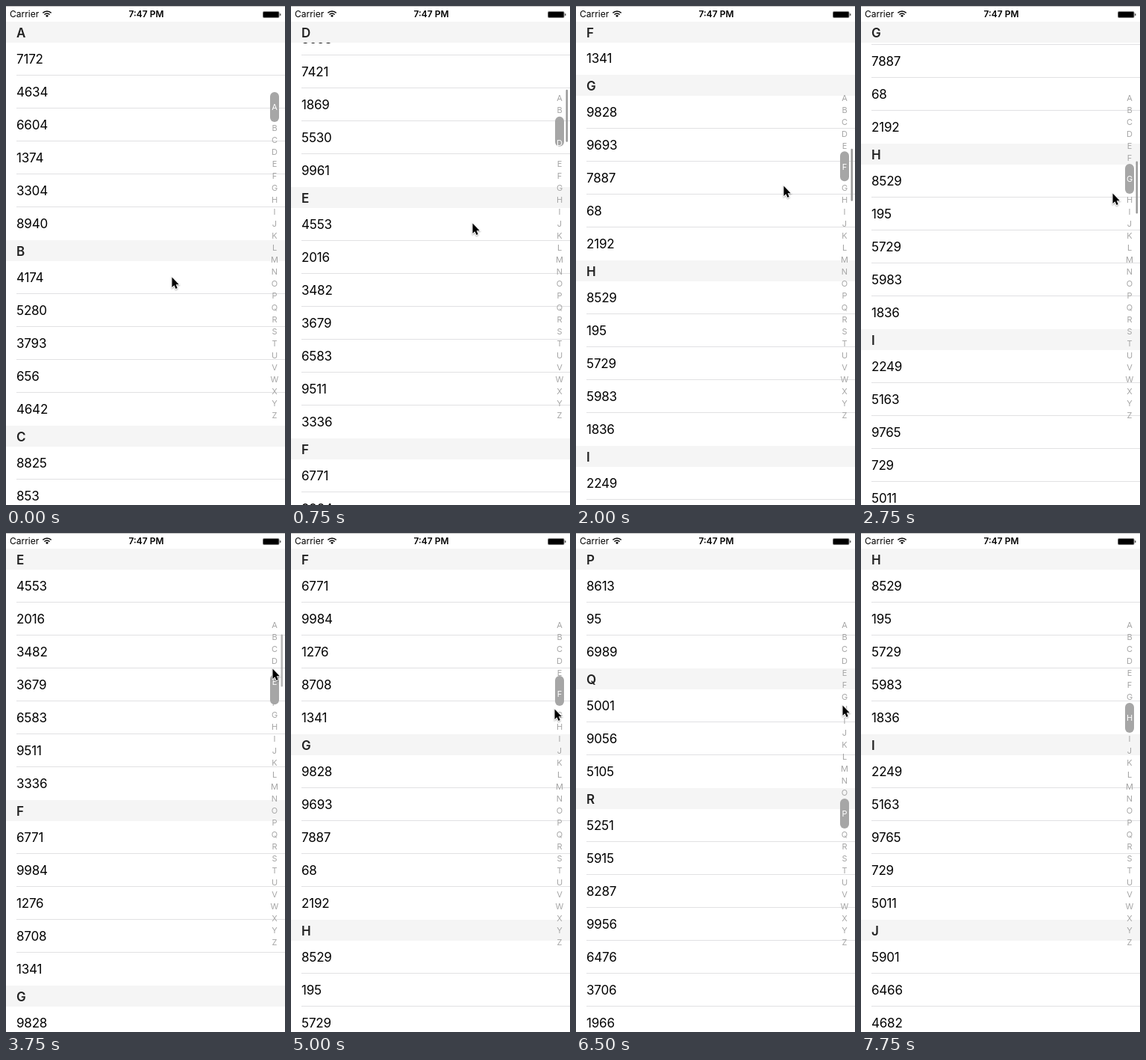
These frames come from a looping animation (374x667 px, 8 s). An HTML page with a canvas:

```html
<!DOCTYPE html>
<html lang="en">
<head>
<meta charset="utf-8">
<title>Indexed list</title>
<style>
html, body { margin: 0; width: 100%; height: 100%; overflow: hidden; background: #fff; }
canvas { display: block; }
</style>
</head>
<body>
<canvas id="stage" width="374" height="667"></canvas>
<script>
const ctx = document.getElementById('stage').getContext('2d');
const W = 374, H = 667, LOOP = 8000, STEP = 250;
const TOP = 21, HEAD = 28, ROW = 44;
const FONT = 'Inter, Roboto, "Liberation Sans", sans-serif';
const LETTERS = 'ABCDEFGHIJKLMNOPQRSTUVWXYZ';

// List content; sections without an entry get seeded random numbers.
const ROWS = {
  A: '7172 4634 6604 1374 3304 8940',
  B: '4174 5280 3793 656 4642',
  C: '8825 853 6127 2940 7316',
  D: '3058 7421 1869 5530 9961',
  E: '4553 2016 3482 3679 6583 9511 3336',
  F: '6771 9984 1276 8708 1341',
  G: '9828 9693 7887 68 2192',
  H: '8529 195 5729 5983 1836',
  I: '2249 5163 9765 729 5011',
  J: '5901 6466 4682 3175',
  P: '8613 95 6989',
  Q: '5001 9056 5105',
  R: '5251 5915 8287 9956 6476 3706 1966'
};
let seed = 7;
const random = () => (seed = seed * 16807 % 2147483647) / 2147483647;
const randomRows = () =>
  Array.from({ length: 3 + Math.floor(random() * 4) }, () => String(Math.floor(random() * 10000)));

let end = 0;
const sections = [...LETTERS].map(letter => {
  const rows = ROWS[letter] ? ROWS[letter].split(' ') : randomRows();
  const top = end;
  end += HEAD + rows.length * ROW;
  return { letter, rows, top, end };
});

// Motion: two flings, then taps on the index.
const flings = [{ at: 150, by: 984, ms: 1350 }, { at: 1500, by: 721, ms: 1250 }];
const taps = [[3594, 'E'], [4833, 'F'], [6033, 'P'], [7083, 'H']];
const pointer = [
  [0, 222, 362], [250, 229, 325], [500, 238, 270], [1000, 248, 310], [1500, 254, 338],
  [1750, 263, 285], [2000, 278, 240], [2750, 337, 250], [3500, 357, 181], [4500, 357, 181],
  [4750, 354, 222], [5000, 353, 235], [5250, 354, 255], [5900, 357, 383], [6050, 357, 385],
  [6500, 357, 230], [7000, 357, 233], [7200, 358, 230], [7500, 362, 3], [7650, 363, -30]
];
const clamp = v => Math.min(1, Math.max(0, v));

function scrollAt(t) {
  const tap = taps.filter(([at]) => at <= t).pop();
  if (tap) return sections[LETTERS.indexOf(tap[1])].top;
  const travel = flings.map(f => f.by * (1 - (1 - clamp((t - f.at) / f.ms)) ** 3));
  return Math.round(travel[0] + travel[1]);
}

const sectionAt = scroll => sections.findIndex(s => scroll < s.end);

// Recent selections weighted by a sine: each change becomes a cosine ease.
function capsuleAt(t) {
  const n = 60, lag = 250;
  let sum = 0, total = 0;
  for (let i = 0; i < n; i++) {
    const u = (i + 0.5) / n, weight = Math.sin(Math.PI * u);
    sum += weight * sectionAt(scrollAt(t - u * lag));
    total += weight;
  }
  return 115 + 16 * sum / total;
}

function pointerAt(t) {
  const i = pointer.findIndex(p => p[0] > t);
  if (i < 0) return pointer[pointer.length - 1].slice(1);
  const [a, b] = [pointer[i - 1], pointer[i]], u = (t - a[0]) / (b[0] - a[0]);
  return [a[1] + (b[1] - a[1]) * u, a[2] + (b[2] - a[2]) * u];
}

function rect(x, y, w, h, color) {
  ctx.fillStyle = color;
  ctx.fillRect(x, y, w, h);
}

function pill(x, y, w, h, r, color) {
  ctx.fillStyle = color;
  ctx.beginPath();
  ctx.roundRect(x, y, w, h, r);
  ctx.fill();
}

function text(str, x, y, size, { weight = 400, color = '#000', align = 'left', spacing = 0 } = {}) {
  ctx.font = `${weight} ${size}px ${FONT}`;
  ctx.letterSpacing = spacing + 'px';
  ctx.textAlign = align;
  ctx.fillStyle = color;
  ctx.fillText(str, x, y);
}

function drawHeader(letter, y) {
  rect(0, y, W, HEAD, '#f5f5f5');
  text(letter, 14, y + 21, 17, { weight: 600, color: '#222' });
}

function drawList(scroll) {
  const y0 = TOP - scroll;
  for (const s of sections) {
    if (y0 + s.end < TOP || y0 + s.top > H) continue;
    s.rows.forEach((value, i) => {
      const y = y0 + s.top + HEAD + i * ROW;
      text(value, 14, y + 28, 17, { spacing: -0.2 });
      if (i < s.rows.length - 1) rect(14, y + ROW - 1, W, 1, '#e1e1e3');
    });
    // Headers stick to the top until the next one pushes them away.
    drawHeader(s.letter, Math.min(Math.max(y0 + s.top, TOP), y0 + s.end - HEAD));
  }
}

function drawStatus() {
  rect(0, 0, W, TOP, '#fff');
  rect(0, 0, W, 1, '#c4c4c4');
  text('Carrier', 5, 15, 12);
  text('7:47 PM', 188, 15, 12, { weight: 600, align: 'center' });

  ctx.strokeStyle = '#000';
  ctx.lineWidth = 1.5;
  for (const r of [8, 5]) {
    ctx.beginPath();
    ctx.arc(55, 15, r, -Math.PI * 0.75, -Math.PI * 0.25);
    ctx.stroke();
  }
  ctx.fillStyle = '#000';
  ctx.beginPath();
  ctx.moveTo(55, 15);
  ctx.arc(55, 15, 2.8, -Math.PI * 0.75, -Math.PI * 0.25);
  ctx.fill();

  pill(344, 7, 22.5, 9, 2, '#777');
  pill(345, 8, 20.5, 7, 1, '#000');
  pill(367, 10, 1.5, 3, 0.7, '#555');
}

function drawIndex(t, selected) {
  pill(354, capsuleAt(t), 12, 40, 6, '#a6a6a6');
  [...LETTERS].forEach((letter, i) => {
    const y = 123 + 16 * i + 12 * (1 + Math.sign(i - selected));
    const color = i === selected ? '#fff' : '#a6a6a6';
    text(letter, 360, y + 4, 11, { color, align: 'center' });
  });
}

function drawScrollBar(t, scroll) {
  if (t < 250 || t > 4100) return;
  ctx.globalAlpha = clamp((4100 - t) / 500);
  pill(368.5, 24 + scroll / 9.29, 2.5, 70, 1.25, '#999');
  ctx.globalAlpha = 1;
}

const arrow = new Path2D('M0 0V13.6L3 10.7L5.1 15.6L7.2 14.6L5.2 9.8H9.3Z');

function drawPointer([x, y]) {
  ctx.save();
  ctx.translate(x + 0.5, y + 0.5);
  ctx.shadowColor = 'rgba(0,0,0,.35)';
  ctx.shadowBlur = 2;
  ctx.shadowOffsetY = 1;
  ctx.strokeStyle = '#fff';
  ctx.lineWidth = 1.6;
  ctx.stroke(arrow);
  ctx.shadowColor = 'transparent';
  ctx.fillStyle = '#000';
  ctx.fill(arrow);
  ctx.restore();
}

function draw(t) {
  const scroll = scrollAt(t);
  rect(0, 0, W, H, '#fff');
  drawList(scroll);
  drawStatus();
  drawIndex(t, sectionAt(scroll));
  drawScrollBar(t, scroll);
  drawPointer(pointerAt(t));
}

const start = performance.now();
function tick() {
  const t = (performance.now() - start) % LOOP;
  draw(Math.floor(t / STEP) * STEP);
  requestAnimationFrame(tick);
}
tick();
</script>
</body>
</html>
```
